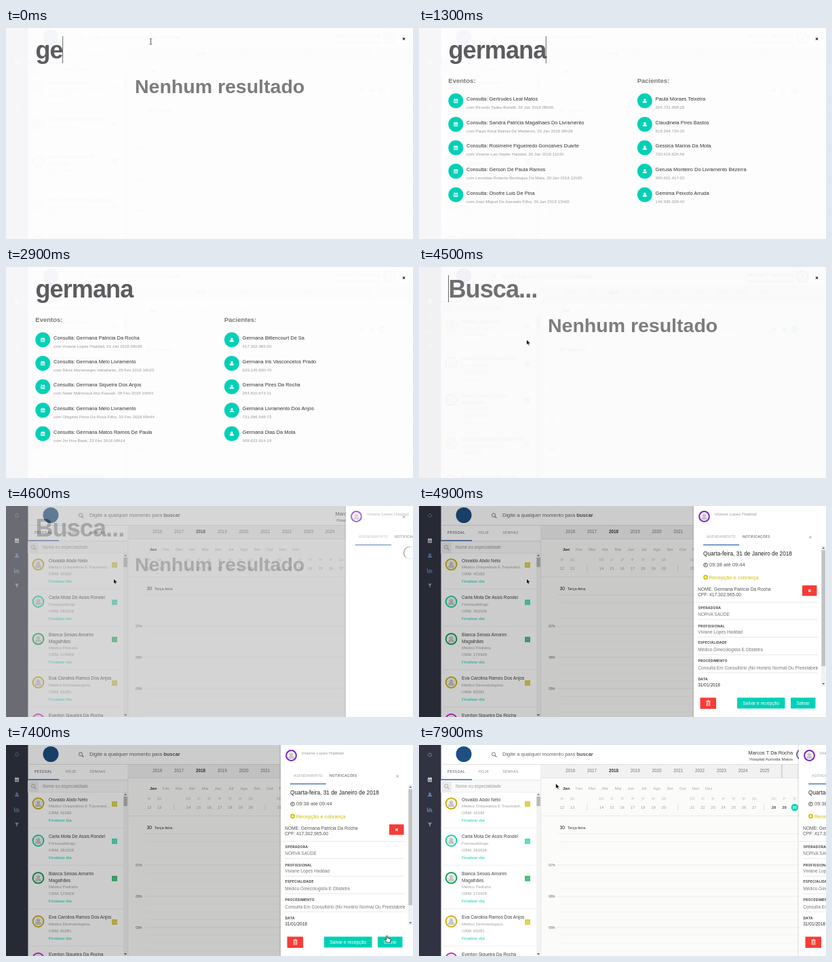
Write an HTML page that moves like this. It is 600 by 311 pixels and loops after 8 s.

```html
<!DOCTYPE html>
<html lang="pt-BR">
<head>
<meta charset="utf-8">
<title>Busca</title>
<style>
html, body { margin: 0; width: 100%; height: 100%; overflow: hidden; background: #fff; }
svg { display: block; width: 100vw; height: 100vh; font-family: "Liberation Sans", Arial, sans-serif; }
text { white-space: pre; }
.caps { font-family: Inter, "Open Sans", sans-serif; letter-spacing: .22px; }
</style>
</head>
<body>
<svg id="stage" viewBox="0 0 600 311"></svg>
<script>
const TEAL = '#00d1b6', RED = '#f63c37', GOLD = '#c9ae12', BLUE = '#3566ad', NAVY = '#313342';
const LOOP = 8000, STEP = 100;
const stage = document.getElementById('stage');

function add(parent, tag, attrs = {}) {
  const node = document.createElementNS('http://www.w3.org/2000/svg', tag);
  for (const k in attrs) node.setAttribute(k, attrs[k]);
  parent.appendChild(node);
  return node;
}
const group = (p, attrs) => add(p, 'g', attrs);
const rect = (p, x, y, width, height, fill, more) => add(p, 'rect', { x, y, width, height, fill, ...more });
const disc = (p, cx, cy, r, fill, more) => add(p, 'circle', { cx, cy, r, fill, ...more });
const path = (p, d, fill, more) => add(p, 'path', { d, fill, ...more });
const line = (p, d, stroke, w = 1) => path(p, d, 'none', { stroke, 'stroke-width': w });
// cy is the middle of the line of text
function text(p, x, cy, str, size, fill, more) {
  const node = add(p, 'text', { x, y: cy + size * .34, 'font-size': size, fill, ...more });
  node.textContent = str;
  return node;
}
const BOLD = { 'font-weight': 700 }, MID = { 'text-anchor': 'middle' }, END = { 'text-anchor': 'end' };
const at = (x, y) => ({ transform: `translate(${x} ${y})` });

function calendarIcon(p, x, y, ink, hole) {
  const g = group(p, at(x, y));
  rect(g, -3, -2.4, 6, 5.6, ink, { rx: .5 });
  rect(g, -2, -3.4, 1, 1.6, ink);
  rect(g, 1, -3.4, 1, 1.6, ink);
  for (let i = 0; i < 6; i++) rect(g, -2.3 + i % 3 * 1.7, -.7 + (i > 2) * 1.7, 1.2, 1.2, hole);
}
function userIcon(p, x, y, ink, s = 1) {
  const g = group(p, { transform: `translate(${x} ${y}) scale(${s})` });
  disc(g, 0, -1.3, 1.8, ink);
  path(g, 'M-3 3V2Q-3 .4-1.3 .4H1.3Q3 .4 3 2V3Z', ink);
}
function lens(p, x, y, ink) {
  disc(p, x, y, 2.6, 'none', { stroke: ink, 'stroke-width': 1 });
  line(p, `M${x + 2} ${y + 2}l2.4 2.4`, ink, 1.2);
}
function cross(p, x, y, r, ink, w) {
  line(p, `M${x - r} ${y - r}l${2 * r} ${2 * r}m0 ${-2 * r}l${-2 * r} ${2 * r}`, ink, w);
}
function avatar(p, x, y, r, ring) {
  disc(p, x, y, r, '#fff', { stroke: ring, 'stroke-width': 2 });
  disc(p, x, y, r - 2, '#ececec');
  userIcon(p, x, y + .5, '#c4c4c8', r / 5.5);
}

// Main page
const page = group(stage);
rect(page, 0, 0, 600, 311, '#fff');
rect(page, 0, 0, 32.5, 311, NAVY);
const power = group(page);
line(power, 'M14.6 12.2a2.6 2.6 0 1 0 2.8 0M16 11v3', '#8b90a0', .8);
const busy = disc(page, 16, 14, 2.4, 'none', { stroke: '#8b90a0', 'stroke-width': 1, 'stroke-dasharray': '1.4 .5' });
calendarIcon(page, 16, 51, '#e4e6ea', NAVY);
userIcon(page, 16, 73, '#6384b5');
line(page, 'M12.5 92v6h7.5M14.5 97v-2.5M16.4 97v-4M18.4 97v-3', '#6384b5', 1.1);
path(page, 'M13 114.5h6l-2.2 2.7v3l-1.6-1v-2z', '#8b93ab');

disc(page, 66, 13.5, 11.5, '#1d4f80');
lens(page, 110, 13.5, '#777');
text(page, 123, 13.8, 'Digite a qualquer momento para ', 7.5, '#666');
text(page, 232.2, 13.8, 'buscar', 7.5, '#555', BOLD);
text(page, 551, 11.7, 'Marcos T Da Rocha', 7.4, '#333', END);
text(page, 551, 20.7, 'Hospital Aurivida Matos', 6.1, '#444', END);
avatar(page, 565, 14, 8, '#7b62a8');
line(page, 'M32.5 28.5H600', '#e0e0e0');

// Staff column
[['PESSOAL', 55, '#4a4f60'], ['HOJE', 95.5, '#8a8a8a'], ['SENHAS', 135, '#8a8a8a']]
  .forEach(([s, x, c]) => text(page, x, 39, s, 5.4, c, { ...MID, class: 'caps' }));
line(page, 'M32.5 51.5H180', '#e6e6e6');
line(page, 'M32.5 51H78', BLUE, 1.4);
rect(page, 32.5, 53, 147, 16.5, '#fafafa', { stroke: '#e8e8e8', 'stroke-width': .6 });
rect(page, 32.5, 53, 15.5, 16.5, '#ececec');
lens(page, 40, 60.5, '#aaa');
text(page, 54, 61, 'Nome ou especialidade', 6.4, '#999');

const staff = [
  [80.3, ['Osvaldo Abdo Neto'], 'Médico Ortopedista E Traumatol...', '43182', GOLD, '#dcd04e'],
  [135.2, ['Carla Mota De Assis Rondel'], 'Fonoaudiólogo', '291536', '#16d09c', '#4de0bd'],
  [190.1, ['Bianca Seixas Amorim', 'Magalhães'], 'Médico Pediatra', '170429', '#0da34b', '#3fc077'],
  [254.2, ['Eva Carolina Ramos Dos Anjos'], 'Médico Dermatologista', '93281', GOLD, '#dcd04e'],
  [308.8, ['Everton Siqueira Da Rocha'], '', '', '#c62fc2', '#d070d0']
];
staff.forEach(([y, names, job, crm, ring, tag]) => {
  avatar(page, 47.5, y + 5.8, 7.9, ring);
  names.forEach((n, i) => text(page, 63, y + i * 9.3, n, 6.64, '#444'));
  if (!job) return;
  const y2 = y + (names.length - 1) * 9.3;
  text(page, 63, y2 + 9.7, job, 5.95, '#a2a2a2');
  text(page, 63, y2 + 19.8, 'CRM: ' + crm, 6, '#999');
  text(page, 63, y2 + 30.2, 'Finalizar dia', 6.25, TEAL);
  rect(page, 156, y + 2.7, 8, 8, tag);
  line(page, `M158 ${y + 6.9}h4`, '#fff6', .8);
  line(page, `M32.5 ${y2 + 42}H173`, '#efefef');
});
rect(page, 173, 70, 7, 241, '#f3f3f3');
rect(page, 173.4, 76, 5.4, 14, '#b8b8b8');
path(page, 'M174 74h4l-2-2.4z', '#777');
path(page, 'M174 307h4l-2 2.4z', '#555');
line(page, 'M180 28.5V311', '#e2e2e2');

// Agenda
rect(page, 180.5, 49, 420, 262, '#fbfbfa');
rect(page, 180.5, 29, 420, 19.5, '#f1f1f1');
line(page, 'M180 48.5H600', '#e2e2e2');
line(page, 'M535 29V48', '#b5b5b5');
for (let i = 0; i < 10; i++)
  text(page, 223.3 + i * 31.8, 38, 2016 + i, 6.3, i === 2 ? '#333' : '#777', i === 2 ? { ...MID, ...BOLD } : MID);
'Jan Fev Mar Abr Mai Jun Jul Ago Set Out Nov Dez'.split(' ').forEach((m, i) =>
  text(page, 217 + i * 19.1, 64, m, 6.1, i ? '#aaa' : '#333', { ...MID, 'font-weight': i ? 400 : 700 }));
const week = ['DO', '2ª', '3ª', '4ª', '5ª', '6ª', 'SA'];
for (let d = 12; d <= 30; d++) {
  const x = d < 14 ? 211 + (d - 12) * 15 : d < 21 ? 269 + (d - 14) * 15.3 : d < 28 ? 403 + (d - 21) * 15.2 : 523 + (d - 28) * 15.4;
  const late = d > 27;
  text(page, x, 79, week[d % 7], 5, '#bbb', MID);
  if (d === 30) disc(page, x, 92, 5.2, TEAL);
  text(page, x, 92, d, 5.8, d === 30 ? '#fff' : late ? '#555' : '#a0a0a0', { ...MID, 'font-weight': late ? 700 : 400 });
}
[248, 382, 509].forEach(x => line(page, `M${x} 87.5v9`, '#ddd'));
line(page, 'M180 104.5H600', '#ececec');
text(page, 207.5, 122, '30', 6.9, '#222');
text(page, 219, 122, 'Terça-feira', 5.6, '#333');
for (let i = 0; i < 16; i++) {
  const y = 131 + i * 11.5;
  line(page, `M${i % 4 ? 208 : 204} ${y}H600`, i % 4 ? '#f3f3f3' : '#e6e6e6', .8);
}
['07h', '08h', '09h'].forEach((h, i) => text(page, 200.5, 177 + i * 46, h, 5.6, '#666', END));

const dim = rect(stage, 0, 0, 600, 311, '#000');

// Booking panel
const defs = add(stage, 'defs');
rect(add(defs, 'clipPath', { id: 'body' }), 0, 58, 183, 209.5, '#000');
const panel = group(stage);
rect(panel, -2, 0, 2, 311, '#0001');
rect(panel, 0, 0, 195, 311, '#fff');
avatar(panel, 15.5, 15.5, 7.4, '#7a1fc4');
text(panel, 30.5, 12, 'Viviane Lopes Haddad', 6.2, '#999');
text(panel, 19, 45.5, 'AGENDAMENTO', 5.2, '#b0b4b8', { class: 'caps', 'font-weight': 500 });
text(panel, 72, 45.5, 'NOTIFICAÇÕES', 5.1, '#777', { class: 'caps', 'font-weight': 600 });
line(panel, 'M14 57.3H67', BLUE, 1.3);
cross(panel, 172, 46, 1.7, '#999', .8);
const wait = group(panel);
disc(wait, 0, 0, 9, 'none', { stroke: '#e6e6e6', 'stroke-width': 1.2 });
line(wait, 'M0-9A9 9 0 0 0-5.6 7', '#777', 1.2);

const details = group(panel);
const body = group(details, { 'clip-path': 'url(#body)' });
text(body, 14, 70, 'Quarta-feira, 31 de Janeiro de 2018', 8.27, '#222');
disc(body, 17.5, 87, 2.8, 'none', { stroke: '#555', 'stroke-width': 1 });
line(body, 'M17.5 85v2.2h-1.5', '#555', .8);
text(body, 23, 86.7, '09:38 até 09:44', 7.6, '#555');
disc(body, 17.5, 105, 3.4, '#cfbf00');
line(body, 'M15.5 105h4M17.5 103v4', '#fff', 1);
text(body, 22.7, 105, 'Recepção e cobrança', 7.5, '#cfbf00');
text(body, 6, 122.8, 'NOME: Germana Patricia Da Rocha', 6.7, '#555');
text(body, 6, 130.8, 'CPF: 417.302.965-00', 6.7, '#555');
rect(body, 160, 117, 21.5, 15.5, RED, { rx: 1 });
cross(body, 170.8, 124.8, 1.7, '#fff', 1.3);
line(body, 'M0 142H183', '#e4e4e4', .8);
[
  ['OPERADORA', 150.3, 'NORVA SAÚDE', 160],
  ['PROFISSIONAL', 176.8, 'Viviane Lopes Haddad', 186],
  ['ESPECIALIDADE', 201.5, 'Médico Ginecologista E Obstetra', 212],
  ['PROCEDIMENTO', 228.2, 'Consulta Em Consultório (No Horário Normal Ou Preestabelecido)', 238.5],
  ['DATA', 254.8, '31/01/2018', 263.5]
].forEach(([label, y, value, vy], i) => {
  text(body, 6.5, y, label, 5, '#444', { class: 'caps', 'font-weight': 700 });
  text(body, 6.2, vy, value, 6.55, i === 4 ? '#333' : '#777');
  if (i < 4) line(body, `M6 ${vy + 7.3}H183`, '#e4e4e4', .8);
});
rect(details, 188, 58, 6.5, 208, '#f1f1f1');
rect(details, 188.4, 65, 5.6, 171, '#c1c1c1');
path(details, 'M189.2 63h4l-2-2.4z', '#666');
path(details, 'M189.2 261h4l-2 2.4z', '#666');
rect(details, 9.5, 282.5, 23.5, 16.5, RED, { rx: 1 });
rect(details, 19.2, 288.6, 4.6, 5.4, 'none', { stroke: '#fff', 'stroke-width': .8 });
line(details, 'M18 287.6h7M20.2 286.4h2.6M20.8 289.8v3M22.2 289.8v3', '#fff', .7);
rect(details, 64, 282.5, 70.5, 16, TEAL, { rx: 1 });
text(details, 99.2, 290.5, 'Salvar e recepção', 6.7, '#fff', MID);
rect(details, 143, 282.5, 36.5, 16, TEAL, { rx: 1 });
text(details, 161.2, 290.5, 'Salvar', 6.7, '#fff', MID);

// Search overlay
const overlay = group(stage);
rect(overlay, 0, 0, 600, 311, '#fefdfe', { 'fill-opacity': .96 });
cross(overlay, 586.5, 16, 1.6, '#222', 1.2);
const query = add(overlay, 'text', { x: 43.5, y: 45, 'font-size': 36, 'font-weight': 700, 'letter-spacing': -.9 });
const caret = rect(overlay, 0, 12, .9, 40, '#555');
const none = text(overlay, 190, 86.5, 'Nenhum resultado', 28.5, '#7c7c7c', BOLD);

function results(events, patients) {
  const g = group(overlay);
  text(g, 43.3, 78, 'Eventos:', 9.5, '#7a7a7a', BOLD);
  text(g, 321.7, 78, 'Pacientes:', 9.5, '#7a7a7a', BOLD);
  const row = (x, i, title, sub, icon) => {
    const y = 107.3 + i * 34.6;
    disc(g, x, y, 11, TEAL);
    icon(g, x, y, '#fff', TEAL);
    text(g, x + 15.8, y - 2.7, title, 7.45, '#333');
    text(g, x + 15.8, y + 9.8, sub, 6.12, '#999');
  };
  events.forEach(([who, sub], i) => row(54.3, i, 'Consulta: ' + who, 'com ' + sub, calendarIcon));
  patients.forEach(([who, id], i) => row(332.8, i, who, id, (p, x, y, ink) => userIcon(p, x, y, ink)));
  return g;
}
const broad = results([
  ['Gertrudes Leal Matos', 'Ricardo Tadeu Bonelli, 30 Jan 2018 08h06'],
  ['Sandra Patricia Magalhaes Do Livramento', 'Paulo Kenji Batista De Medeiros, 30 Jan 2018 08h38'],
  ['Rosimeire Figueiredo Goncalves Duarte', 'Vicente Luis Nader Haddad, 30 Jan 2018 11h30'],
  ['Gerson De Paula Ramos', 'Leonidas Roberto Bevilaqua Da Mata, 30 Jan 2018 12h35'],
  ['Onofre Luis De Pina', 'Joao Miguel De Azevedo Filho, 30 Jan 2018 13h00']
], [
  ['Paula Moraes Teixeira', '204.731.958-28'],
  ['Claudineia Pires Bastos', '518.264.730-15'],
  ['Gessica Marina Da Mota', '730.419.625-56'],
  ['Gerusa Monteiro Do Livramento Bezerra', '385.602.417-20'],
  ['Gemima Peixoto Arruda', '146.935.208-40']
]);
const exact = results([
  ['Germana Patricia Da Rocha', 'Viviane Lopes Haddad, 31 Jan 2018 09h38'],
  ['Germana Melo Livramento', 'Silvia Montenegro Valladares, 05 Fev 2018 16h22'],
  ['Germana Siqueira Dos Anjos', 'Nadir Mahmoud Abu Kassab, 08 Fev 2018 10h54'],
  ['Germana Melo Livramento', 'Olegario Pena Da Rosa Filho, 10 Fev 2018 09h44'],
  ['Germana Matos Ramos De Paula', 'Jin Hoo Baek, 22 Fev 2018 08h14']
], [
  ['Germana Bittencourt De Sa', '417.302.965-00'],
  ['Germana Iris Vasconcelos Prado', '629.145.830-70'],
  ['Germana Pires Da Rocha', '254.810.673-11'],
  ['Germana Livramento Dos Anjos', '731.096.548-72'],
  ['Germana Dias Da Mota', '508.623.914-19']
]);

// Pointer
const pointer = group(stage);
const outline = { stroke: '#fff', 'stroke-width': .7 };
const shapes = {
  beam: line(pointer, 'M-1.8-4.2h1.2L0-3.8 .6-4.2h1.2M0-3.8V3.8M-1.8 4.2h1.2L0 3.8 .6 4.2h1.2', '#333', .8),
  arrow: path(pointer, 'M0 0V8l1.9-1.7L3.2 9l1.4-.6L3.4 5.8H6Z', '#111', outline),
  hand: path(pointer, 'M0 0q1-.5 1.3.5V3.6l4 1q1 .4.8 1.6L5.5 10H.6L-2.4 6.3q-.3-1 .7-1L-.3 6.3V.6Z', '#fff', { stroke: '#222', 'stroke-width': .8 })
};

// Linear track through [time, value, value...] rows
function track(rows, t) {
  let i = rows.findIndex(r => r[0] > t);
  if (i < 0) i = rows.length;
  const a = rows[Math.max(i - 1, 0)], b = rows[Math.min(i, rows.length - 1)];
  const k = b[0] > a[0] ? (t - a[0]) / (b[0] - a[0]) : 0;
  return a.slice(1).map((v, j) => v + (b[j + 1] - v) * k);
}
const tracks = {
  panel: [[4500, 600], [4600, 501], [4700, 440], [4800, 413], [4900, 405], [7500, 405], [7600, 422], [7700, 462], [7900, 560]],
  dim: [[4400, 0], [4500, .12], [4600, .23], [4700, .2], [7400, .2], [7700, .05], [7800, 0]],
  overlay: [[4300, 1], [4500, .98], [4600, .33], [4700, 0]],
  none: [[600, 1], [900, 0], [4000, 0], [4300, 1]],
  broad: [[800, 0], [1300, 1], [1600, 1], [2100, 0]],
  exact: [[2000, 0], [2900, 1], [3900, 1], [4200, 0]],
  pointer: [[0, 213.5, 20], [3500, 213, 20], [3700, 190, 62], [3900, 162, 101], [4000, 158.5, 107],
    [5100, 158.5, 107], [5300, 230, 111], [5500, 365, 110], [5700, 455, 105], [5800, 466, 105],
    [6600, 466, 105], [6800, 505, 185], [7000, 550, 268], [7100, 561, 281], [7400, 561, 281],
    [7600, 420, 175], [7800, 230, 76], [7900, 201.5, 56.5]]
};
const WORD = 'germana';
const between = (t, a, b) => t >= a && t < b;
const show = (node, on) => node.setAttribute('visibility', on ? 'inherit' : 'hidden');

function pointerShape(t) {
  if (t < 500) return 'beam';
  if (t < 3500) return '';
  return between(t, 3900, 4300) || between(t, 5700, 6700) || between(t, 7000, 7500) ? 'hand' : 'arrow';
}

function draw(t) {
  const get = name => track(tracks[name], t);
  [[dim, 'dim'], [overlay, 'overlay'], [none, 'none'], [broad, 'broad'], [exact, 'exact']]
    .forEach(([node, name]) => node.setAttribute('opacity', get(name)[0]));

  const typed = t < 500 ? 2 : Math.min(WORD.length, 3 + Math.floor((t - 500) / 150));
  const cleared = t >= 4200;
  query.textContent = cleared ? 'Busca...' : WORD.slice(0, typed);
  query.setAttribute('fill', cleared ? '#6e6e6e' : '#5c5c5f');
  caret.setAttribute('x', cleared ? 43 : 43 + query.getComputedTextLength());
  show(caret, t < 1600 || between(t, 2100, 2600) || between(t, 3500, 4000) || between(t, 4200, 4600));

  const [px] = get('panel');
  panel.setAttribute('transform', `translate(${px} 0)`);
  show(panel, px < 600);
  show(details, t >= 4800);
  show(wait, t < 4800);
  wait.setAttribute('transform', `translate(94.5 69) rotate(${(t - 4600) * .5})`);

  const loading = between(t, 4400, 5700) || between(t, 7200, 7700);
  show(busy, loading);
  show(power, !loading);

  const [mx, my] = get('pointer');
  pointer.setAttribute('transform', `translate(${mx} ${my})`);
  const shape = pointerShape(t);
  for (const k in shapes) show(shapes[k], k === shape);
}

const start = performance.now();
function tick() {
  const t = (performance.now() - start) % LOOP;
  draw(Math.floor(t / STEP) * STEP);
  requestAnimationFrame(tick);
}
tick();
</script>
</body>
</html>
```
